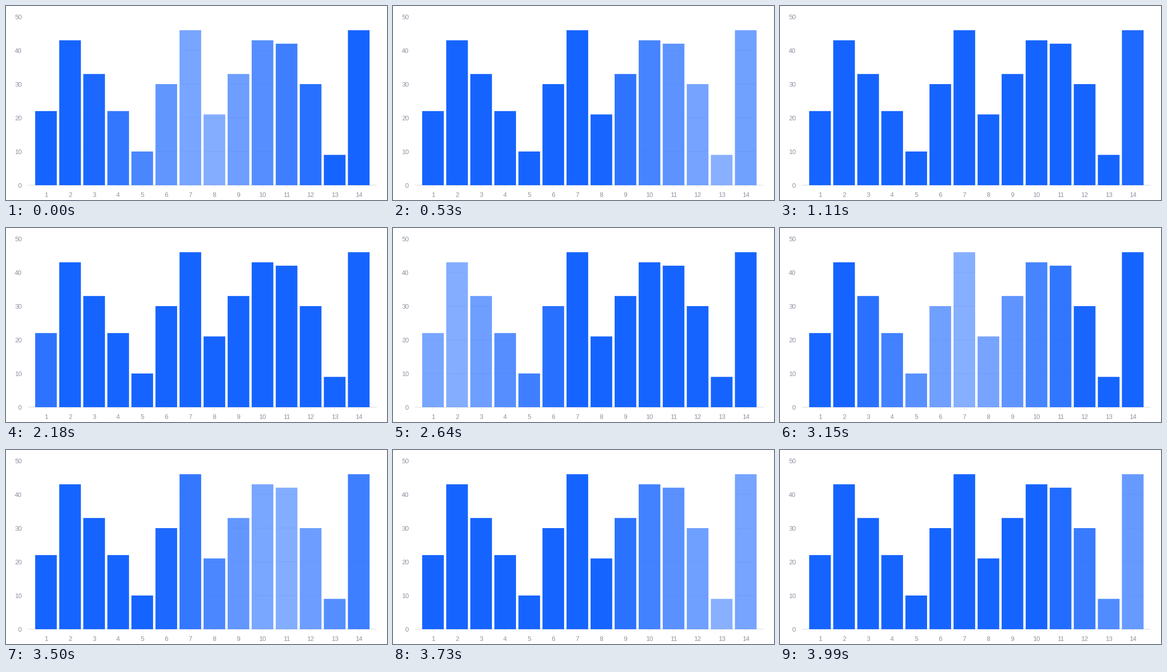
A matplotlib script that plays this animation: 746x380 px, repeating every 4.01 s.

```python
import numpy as np
import matplotlib.pyplot as plt
from matplotlib.animation import FuncAnimation
from matplotlib.patches import Rectangle

W, H, DPI = 746, 380, 100
LOOP, TICK = 4010, 10        # ms
HOLD = 57.5                  # ms between refreshes of the wave
SECOND_PASS = 2180           # ms
BLUE, GREY, AXIS, GRID = "#1664ff", "#8b919f", "#d3d6de", "#e8eaf0"

values = [22, 43, 33, 22, 10, 30, 46, 21, 33, 43, 42, 30, 9, 46]
count = len(values)

# Band scale: inner padding 0.1, outer padding 0.3
X0, X1, BASE, UNIT = 43, 726, 351, 6.6
step = (X1 - X0) / (count - 0.1 + 0.6)
lefts = X0 + 0.3 * step + step * np.arange(count)
bar_w = 0.9 * step

px = 72 / DPI
plt.rcParams["font.family"] = "Liberation Sans"
fig = plt.figure(figsize=(W / DPI, H / DPI), dpi=DPI, facecolor="white")
ax = fig.add_axes([0, 0, 1, 1])
ax.set_xlim(0, W)
ax.set_ylim(H, 0)
ax.axis("off")


def label(x, y, text, align):
    ax.text(x, y, text, fontsize=12.5 * px, color=GREY, ha=align,
            va="center_baseline")


line = dict(lw=px, snap=False, zorder=1)
ax.hlines(BASE, X0, X1, color=AXIS, **line)
ax.vlines(lefts + bar_w / 2, BASE, BASE + 4, color=AXIS, **line)

for g in range(0, 51, 10):
    label(31, BASE - g * UNIT + 0.5, str(g), "right")

bars = []
for i, (x, v) in enumerate(zip(lefts, values), 1):
    # Grid lines only show through the translucent bars
    for g in range(10, v, 10):
        ax.hlines(BASE - g * UNIT, x + 1, x + bar_w - 1, color=GRID, **line)
    bar = Rectangle((x, BASE - v * UNIT), bar_w, v * UNIT, facecolor=BLUE,
                    edgecolor="none", lw=0, snap=False, zorder=2)
    bars.append(ax.add_patch(bar))
    label(x + bar_w / 2, 369.5, str(i), "center")


def wave_center(now):
    """Position of the palest point, counted in bars."""
    if now < SECOND_PASS:
        start, first, speed = 0, 7.75, 0.01
    else:
        start, first, speed = SECOND_PASS, -3.03, 0.0104
    held = (now - start + TICK) // HOLD * HOLD
    return first + speed * held


def draw(frame):
    center = wave_center(frame * TICK)
    for i, bar in enumerate(bars, 1):
        bar.set_alpha(min(1, 0.5 + abs(i - center) / 10))
    return bars


anim = FuncAnimation(fig, draw, frames=LOOP // TICK, interval=TICK,
                     repeat=True, repeat_delay=0, blit=False)
plt.show()
```
